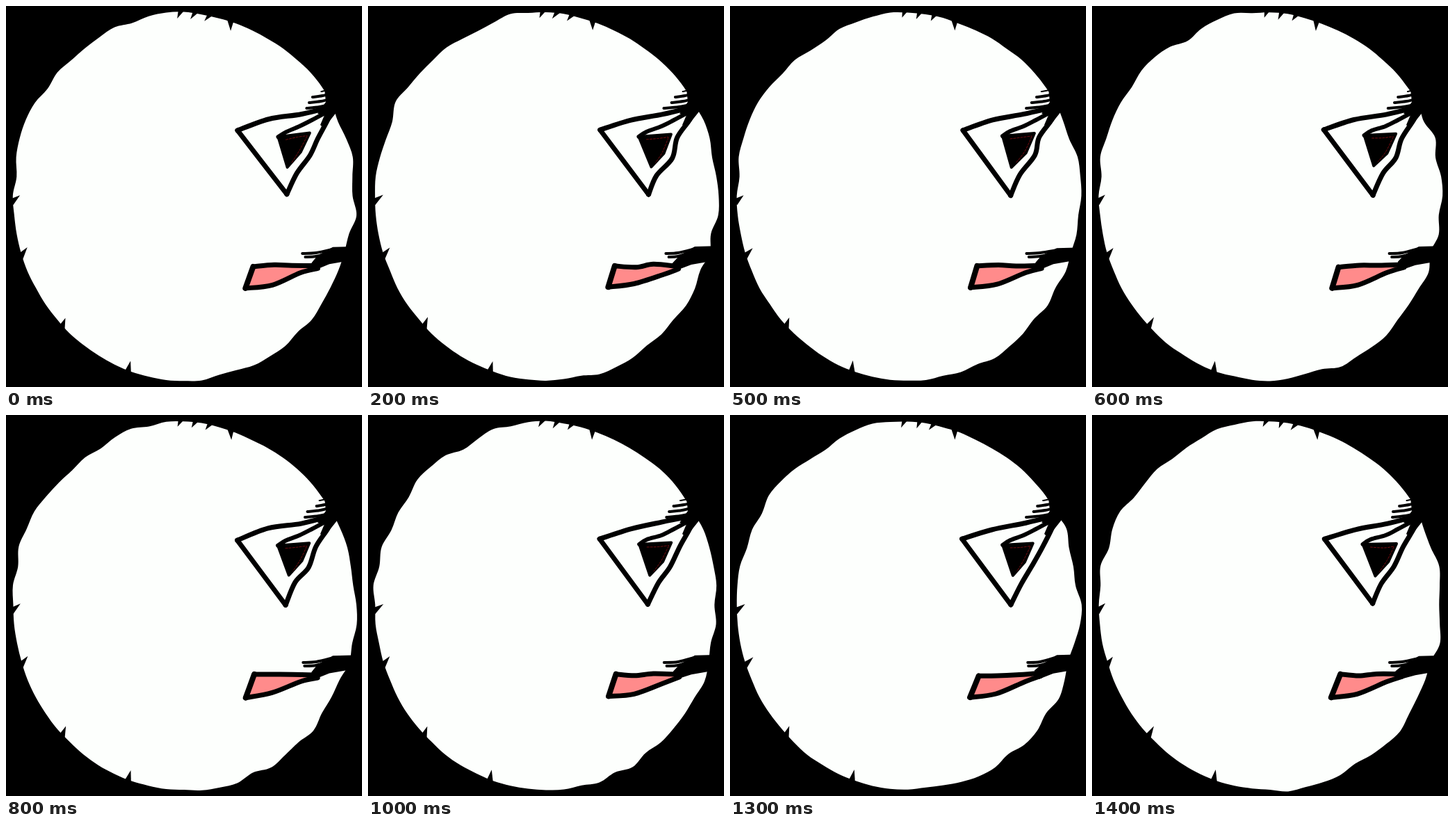
Recreate the animation shown at these times as an HTML page with a canvas. Size 512 by 548 pixels, loop 1500 ms.

```html
<!DOCTYPE html>
<html lang="en">
<head>
<meta charset="utf-8">
<title>Wobbling face</title>
<style>
  html, body { margin: 0; width: 100%; height: 100%; overflow: hidden; background: #000; }
  canvas { display: block; width: 100vw; height: 100vh; }
</style>
</head>
<body>
<canvas id="stage" width="512" height="548"></canvas>
<script>
const ctx = document.getElementById('stage').getContext('2d');
const STEP = 100, STEPS = 15, RAD = Math.PI / 180;
const PAPER = '#fdfffd', INK = '#000', PINK = '#ff8b8b', RED = '#7a0c10';

// Each redrawing has its own seed, so the loop repeats exactly.
let random;
function seeded(seed) {
  let s = seed * 7919 + 17;
  return () => {
    s = (s + 0x6D2B79F5) | 0;
    let t = Math.imul(s ^ (s >>> 15), s | 1);
    t ^= t + Math.imul(t ^ (t >>> 7), t | 61);
    return ((t ^ (t >>> 14)) >>> 0) / 4294967296;
  };
}
const shake = amount => (random() * 2 - 1) * amount;
const loose = (points, amount) =>
  points.map(([x, y]) => [x + shake(amount), y + shake(amount)]);

// Smooth curve through all points.
function curve(points, closed) {
  const n = points.length;
  const at = i => closed ? points[(i + n) % n] : points[Math.max(0, Math.min(n - 1, i))];
  ctx.moveTo(...points[0]);
  for (let i = 0; i < (closed ? n : n - 1); i++) {
    const [a, b, c, d] = [at(i - 1), at(i), at(i + 1), at(i + 2)];
    ctx.bezierCurveTo(
      b[0] + (c[0] - a[0]) / 6, b[1] + (c[1] - a[1]) / 6,
      c[0] - (d[0] - b[0]) / 6, c[1] - (d[1] - b[1]) / 6, c[0], c[1]);
  }
}

function line(points, width, color = INK) {
  ctx.beginPath();
  curve(points, false);
  ctx.lineWidth = width;
  ctx.strokeStyle = color;
  ctx.stroke();
}

function polygon(points, color, outline = 0) {
  ctx.beginPath();
  points.forEach(p => ctx.lineTo(...p));
  ctx.closePath();
  ctx.fillStyle = ctx.strokeStyle = color;
  ctx.fill();
  if (outline) {
    ctx.lineWidth = outline;
    ctx.stroke();
  }
}

const bump = (x, center, width) => Math.exp(-(((x - center) / width) ** 2));

// Point of the head's edge; the ellipse is a little flattened on both shoulders.
function rimPoint(angle, extra = 0) {
  const d = extra - 5 * bump(angle, 241, 13) - 6 * bump(angle, 293, 22) + 2 * bump(angle, 45, 15);
  return [256 + (246 + d) * Math.cos(angle * RAD), 273 + (266 + d) * Math.sin(angle * RAD)];
}

// Only the upper left and the right side ripple; the rest stays calm.
function ripple(angle) {
  const wild = (angle > 180 && angle < 262) || angle < 85 || angle > 335;
  return shake(wild ? 4 : 0.6);
}

function drawHead() {
  const points = [];
  for (let a = 0; a < 360; a += 6) points.push(rimPoint(a, ripple(a)));
  ctx.beginPath();
  curve(points, true);
  ctx.fillStyle = PAPER;
  ctx.fill();
}

// A spike of ink reaching into the head, pulled aside by the drift.
function notch(angle, length, half, driftX, driftY) {
  const [x, y] = rimPoint(angle, 3);
  const dx = driftX - Math.cos(angle * RAD), dy = driftY - Math.sin(angle * RAD);
  const k = 1 / Math.hypot(dx, dy);
  const nx = -dy * k * half, ny = dx * k * half;
  const tip = [x + dx * k * length + shake(2), y + dy * k * length + shake(1)];
  polygon([[x + nx, y + ny], tip, [x - nx, y - ny]], INK);
}

function drawNotches() {
  for (let a = 269; a < 282; a += 5) notch(a, 13, 4, -0.5, 0);
  notch(286, 16, 5, 0.3, 0);
  for (const a of [178, 161, 135, 109]) notch(a, 17, 5, 0, -0.8);
}

function drawEye() {
  const [left, lidA, lidB, bottom] =
    loose([[334, 179], [378, 164], [424, 155], [403, 272]], 1.5);
  const side = loose([[417, 242], [436, 217], [447, 190]], 2.5);
  line([left, lidA, lidB, [468, 145]], 7);
  line([left, bottom], 7);
  line([bottom, ...side, [463, 163], [468, 148]], 7);

  const iris = loose([[391, 187], [437, 184], [425, 211], [406, 231]], 1.5);
  const [a, b, c, d] = iris;
  polygon(iris, INK, 4);
  line([a, [a[0] + 11, a[1] - 7], [422, 173], [440, 164], [466, 150]], 6);

  ctx.setLineDash([3, 2]);
  line([[a[0] + 11, a[1] + 4], [b[0] - 18, b[1] + 6], [b[0] - 4, b[1] + 4]], 1, RED);
  line([[b[0] - 4, b[1] + 5], [c[0] - 2, c[1] - 2], [d[0] + 6, d[1] - 6]], 1, RED);
  ctx.setLineDash([]);

  // Tuft at the outer corner
  polygon([[458, 119], [492, 125], [476, 152], [457, 176], [452, 171],
    [458, 157], [448, 155], [460, 138]], INK);
  for (let i = 0; i < 4; i++) {
    const x = 450 - 7 * i + shake(4), y = 123 + 8 * i;
    line([[x, y], [(x + 470) / 2, y - 2], [470, y - 6]], i ? 4 : 2);
  }
}

function drawMouth() {
  const upper = loose([[356, 374], [385, 374], [411, 373], [443, 373]], 1.8);
  const lower = loose([[424, 385], [383, 401], [345, 406]], 1.8);
  const [tipX, tipY] = upper[3];

  ctx.beginPath();
  curve([...upper, ...lower], false);
  ctx.fillStyle = PINK;
  ctx.fill();
  line(upper, 7);
  line([[tipX + 4, tipY + 4], ...lower], 7);
  line([lower[2], upper[0]], 8);

  // Dark corner running out to the edge, with two whiskers
  const top = 346 + shake(2), base = 369 + shake(2);
  polygon([[tipX - 5, tipY - 4], [448, 359], [470, top + 1], [508, top],
    [508, base - 4], [488, base], [465, base + 4], [444, 380]], INK);
  for (let i = 0; i < 2; i++) {
    const x = 427 + 4 * i + shake(2), y = 356 + 5 * i;
    line([[x, y], [446, y - 1], [470, top + 4 + 4 * i]], 4);
  }
}

function draw(step) {
  random = seeded(step + 1);
  ctx.fillStyle = INK;
  ctx.fillRect(0, 0, 512, 548);
  ctx.lineCap = ctx.lineJoin = 'round';
  drawHead();
  drawNotches();
  drawEye();
  drawMouth();
}

const start = performance.now();
function frame() {
  draw(Math.floor((performance.now() - start) / STEP) % STEPS);
  requestAnimationFrame(frame);
}
frame();
</script>
</body>
</html>
```
